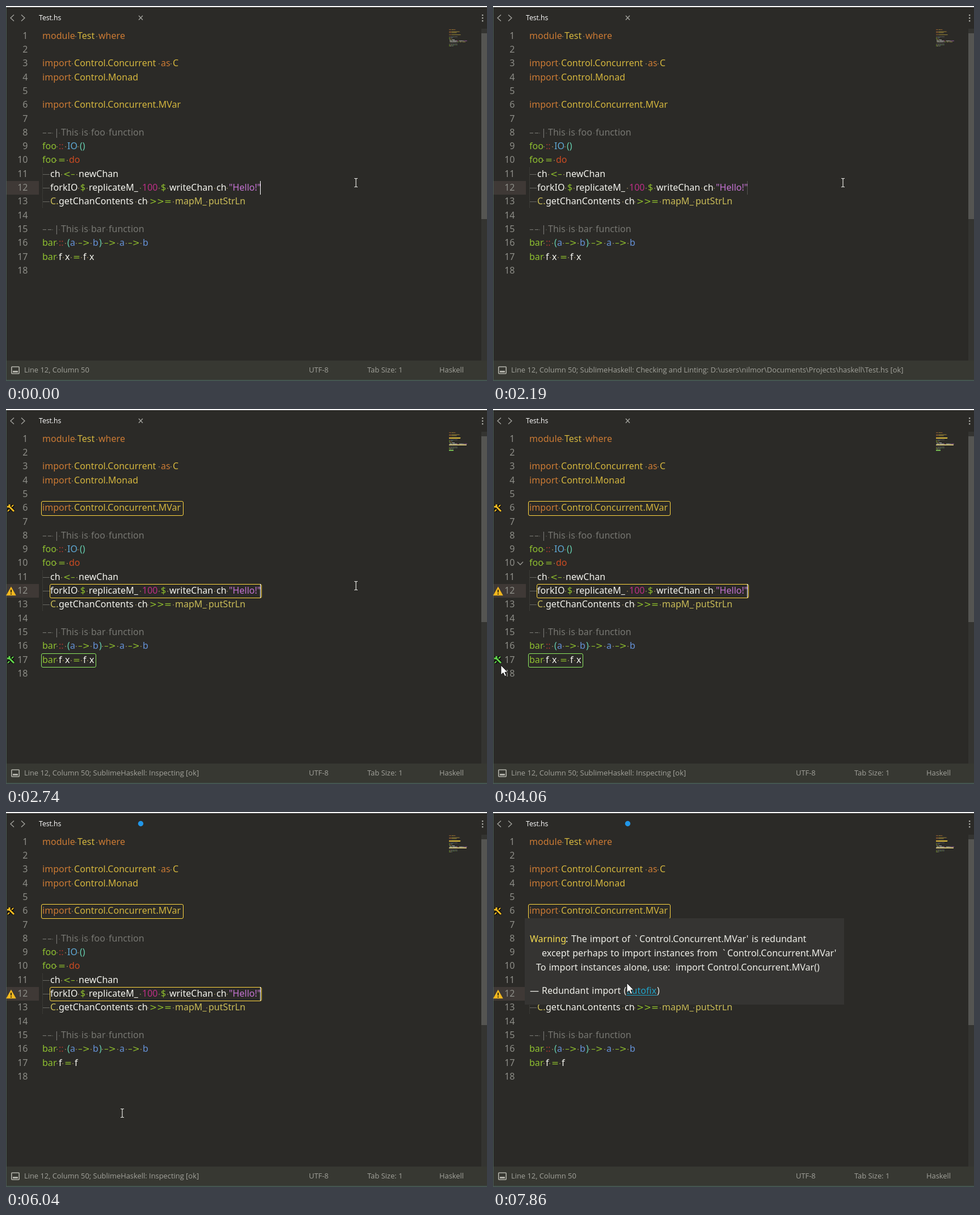
Animation, 848 px wide and 660 px high, one loop 8 s. Source, as an HTML page:

```html
<!DOCTYPE html>
<html lang="en">
<head>
<meta charset="utf-8">
<title>Editor hints</title>
<style>
  html, body { margin: 0; width: 100%; height: 100%; overflow: hidden; background: #2b2a27; }
  svg { display: block; width: 848px; height: 660px; }
  text { white-space: pre; }
  .code { font: 500 16px "Noto Sans", sans-serif; word-spacing: .7px; letter-spacing: .03px; }
  .op { font: 15.5px "DejaVu Sans", sans-serif; }
  .ui { font: 12.9px "Open Sans", sans-serif; }
</style>
</head>
<body>
<svg id="stage" viewBox="0 0 848 660" xmlns="http://www.w3.org/2000/svg"></svg>
<script>
const LOOP = 8000, ROW = 24.3, MARKERS_AT = 2310, FIX_AT = 5930;
const stage = document.getElementById('stage');

const COLORS = {
  o: '#cb7a34', y: '#d4b63e', g: '#8fc030', c: '#777772', r: '#a3382f', b: '#5fa9d6', t: '#66cfb0',
  d: '#cb4b22', w: '#f5f5ef', p: '#8cba2c', m: '#bd2f86', s: '#c473d2', k: '#cbbd58', v: '#6592d8'
};

// Each token: x, colour key, text. "+" marks a token without a space before it.
const CODE = {
  1: '64o module 126y Test 163o where',
  3: '64o import 120y Control.Concurrent 273o as 294y C',
  4: '64o import 120y Control.Monad',
  6: '64o import 120y Control.Concurrent.MVar',
  8: '64c – 73+c – 85c | 97c This 133c is 150c foo 181c function',
  9: '64g foo 93r :: 108b IO 130t ()',
  10: '64g foo 92p = 111d do',
  11: '78w ch 101p <– 128w newChan',
  12: '78w forkIO 131p $ 146w replicateM_ 240m 100 273p $ 288w writeChan 371w ch 393s "Hello!"',
  13: '78k C. 93+w getChanContents 232w ch 253p >>= 298k mapM_ 357k putStrLn',
  15: '64c – 73+c – 85c | 97c This 133c is 150c bar 181c function',
  16: '64g bar 93r :: 108t ( 113+v a 127p –> 153v b 164+t ) 173p –> 200v a 215p –> 241v b'
};
const LINE_17 = '64g bar 93w f 104w x 118p = 136w f 147w x';
const LINE_17_FIXED = '64g bar 93w f 103p = 121w f';

function add(parent, tag, attrs, content) {
  const node = document.createElementNS(stage.namespaceURI, tag);
  for (const key in attrs) node.setAttribute(key, attrs[key]);
  if (content) node.textContent = content;
  parent.append(node);
  return node;
}
const group = (parent = stage) => add(parent, 'g', {});
const rect = (parent, x, y, width, height, fill, more) =>
  add(parent, 'rect', { x, y, width, height, fill, ...more });
const path = (parent, d, stroke, width = 1, fill = 'none') =>
  add(parent, 'path', { d, stroke, 'stroke-width': width, fill });
const text = (parent, x, y, content, fill, kind = 'code', more) =>
  add(parent, 'text', { x, y, fill, class: kind, ...more }, content);
const rowTop = n => Math.round(308 + ROW * (n - 12));
const show = (node, on) => node.setAttribute('visibility', on ? 'visible' : 'hidden');

function codeLine(parent, n, source) {
  const top = rowTop(n);
  let first = true;
  for (const [, x, glued, key, word] of source.matchAll(/(\d+)(\+?)([a-z]) (\S+)/g)) {
    text(parent, x, top + 17, word, COLORS[key], /^[–<>=]+$/.test(word) ? 'op' : 'code');
    if (!first && !glued) rect(parent, x - 4, top + 12, 2, 1.5, key === 'c' ? '#4a4a46' : '#857650');
    rect(parent, 781 + (x - 64) * .08, 41 + 1.8 * (n - 1), word.length * .7, 1.1, COLORS[key], { opacity: .6 });
    first = false;
  }
}

// Window frame
rect(stage, 0, 0, 848, 660, '#2b2a27');
rect(stage, 838, 40, 10, 584, '#343431');
rect(stage, 838, 48, 10, 327, '#555552');
rect(stage, 0, 624, 848, 34, '#373832');
rect(stage, 0, 658, 848, 2, '#455650');
rect(stage, 0, 0, 1, 660, '#4a5b56');
rect(stage, 0, 0, 848, 2, '#fcfcfc');
path(stage, 'M14 15.5L8 21L14 26.5M27 15.5L33 21L27 26.5', '#a5a5a0', 1.3);
for (const y of [15, 20, 25]) rect(stage, 839, y, 2.4, 2.4, '#a5a5a0');
text(stage, 58, 25, 'Test.hs', '#fff', 'ui', { style: 'font-size:12.2px' });
const closeMark = path(stage, 'M234 17L241 24.5M241 17L234 24.5', '#a5a5a0', 1.3);
const dirtyDot = add(stage, 'circle', { cx: 237.5, cy: 20.5, r: 4.7, fill: '#2196e8' });

// Gutter and code
rect(stage, 1, 308, 57, 24, '#3f3936');
for (let n = 1; n <= 18; n++)
  text(stage, 38.5, rowTop(n) + 17, n, '#8d8d87', 'code', { 'text-anchor': 'end' });
const fold = path(stage, 'M43 269L48 274L53 269', '#9a9a94', 1.3);
for (const n of [11, 12, 13]) path(stage, `M65 ${rowTop(n) + 12.5}H77`, '#696963');
add(stage, 'path', { d: 'M64.5 284V356', stroke: '#4b4b46', 'stroke-dasharray': '1 1' });
for (const n in CODE) codeLine(stage, +n, CODE[n]);
const before = group(), after = group();
codeLine(before, 17, LINE_17);
codeLine(after, 17, LINE_17_FIXED);

// Hint markers
function outline(parent, x, y, right, bottom, stroke) {
  rect(parent, x + .5, y + .5, right - x - 1, bottom - y - 1, 'none', { rx: 2.5, stroke });
}
function tools(parent, y, color) {
  const icon = group(parent);
  icon.setAttribute('transform', `translate(1 ${y})`);
  const wrench = 'M4 4L13 13M1 5L5 5L5 1', handle = 'M2 13L5 10M9 5L12 2';
  path(icon, wrench + handle, '#0c0c0a', 5.5);
  path(icon, handle, color, 2);
  path(icon, wrench, color, 3);
}
const YELLOW = '#ffd640', GREEN = '#8ee860';
const warnings = group(), hint = group();
outline(warnings, 62, 162, 313, 188, YELLOW);
outline(warnings, 77, 308, 451, 333, YELLOW);
tools(warnings, 167, '#f6bd22');
path(warnings, 'M9 314L16.5 327.5H1.5Z', '#f3b71f', 1.5, '#f3b71f');
path(warnings, 'M9 318V323M9 324.5V326.5', '#221c08', 1.8);
rect(warnings, 781, 50.5, 20, 1.5, YELLOW);
rect(warnings, 781, 62.5, 31, 1.5, '#f2e08a');
outline(hint, 62, 430, 159, 455, GREEN);
tools(hint, 434, '#62d64c');
rect(hint, 781, 72, 8, 1.5, GREEN);
const caret = rect(stage, 448, 308, 1, 24, '#fff');

// Status bar
add(stage, 'rect', { x: 9.8, y: 635, width: 13.4, height: 12, rx: 1, fill: 'none', stroke: '#b2b2aa', 'stroke-width': 1.6 });
rect(stage, 12, 642, 9, 3, '#b2b2aa');
const GREY = '#a2a29b';
const status = text(stage, 32, 645, '', GREY, 'ui');
const fileInfo = group();
text(fileInfo, 534, 645, 'UTF-8', GREY, 'ui');
text(fileInfo, 637, 645, 'Tab Size: 1', GREY, 'ui');
text(fileInfo, 764, 645, 'Haskell', GREY, 'ui');

// Popups
const INK = '#efefe9';
function popup(x, y, right, bottom, phrases) {
  const box = group();
  rect(box, x, y, right - x, bottom - y, '#353432');
  for (const [px, py, words, color = INK] of phrases) text(box, px, py, words, color);
  return box;
}
function autofix(box, x, y) {
  text(box, x - 5, y, '(', INK);
  text(box, x, y, 'autofix', '#20a3c8');
  rect(box, x, y + 2, 54, 1, '#20a3c8');
  text(box, x + 53.5, y, ')', INK);
}
const hintPopup = popup(56, 454, 246, 624, [
  [65, 496, 'Hint', GREEN], [97, 496, ': Eta reduce'],
  [65, 537, '—'], [86, 537, 'Eta reduce'],
  [75, 562, 'Why not:', '#f5dc50'], [86, 607, 'bar f = f']
]);
autofix(hintPopup, 176, 537);
const warningPopup = popup(56, 187, 619, 339, [
  [65, 229, 'Warning', '#f5dc50'], [128, 229, ':'], [138, 229, 'The import of'],
  [250, 229, '`'], [258, 229, "Control.Concurrent.MVar'"], [456, 229, 'is redundant'],
  [86, 254, 'except perhaps to import instances from'], [405, 254, '`'], [413, 254, "Control.Concurrent.MVar'"],
  [76, 279, 'To import instances alone, use:'], [322, 279, 'import'], [378, 279, 'Control.Concurrent.MVar()'],
  [65, 320, '—'], [86, 320, 'Redundant import']
]);
autofix(warningPopup, 235.5, 320);

// Mouse
const mouse = group();
const beam = group(mouse), arrow = group(mouse);
path(beam, 'M-3 -7.5H-1L0 -6.5L1 -7.5H3M0 -6.5V6.5M-3 7.5H-1L0 6.5L1 7.5H3', '#e4e4e0', 1.2);
path(arrow, 'M0 0V17L4 13.3L6.8 19.5L9.6 18.2L6.9 12.2H12Z', '#111', 1, '#fff');

const MOUSE_KEYS = [ // time, x, y
  [2740, 617, 311], [3670, 100, 475], [4060, 14, 451], [4830, 14, 451], [5250, 170, 502],
  [5680, 205, 530], [6350, 205, 530], [7140, 13, 178], [7580, 13, 178], [7860, 236, 301]
];
function mouseAt(t) {
  const next = MOUSE_KEYS.findIndex(key => key[0] > t);
  if (next < 1) return (next ? MOUSE_KEYS.at(-1) : MOUSE_KEYS[0]).slice(1);
  const [t0, x0, y0] = MOUSE_KEYS[next - 1], [t1, x1, y1] = MOUSE_KEYS[next];
  const steps = Math.round((t1 - t0) / 135);
  const k = Math.floor((t - t0) / (t1 - t0) * steps) / steps;
  return [x0 + (x1 - x0) * k, y0 + (y1 - y0) * k];
}

function statusAt(t) {
  const position = 'Line 12, Column 50', plugin = position + '; SublimeHaskell: ';
  const checking = plugin + 'Checking and Linting: D:\\users\\nilmor\\Documents\\Projects\\haskell\\Test.hs';
  if (t < 550 || t >= 6600) return position;
  if (t < 1230) return checking;
  return t < MARKERS_AT ? checking + ' [ok]' : plugin + 'Inspecting [ok]';
}

function render(t) {
  const fixed = t >= FIX_AT;
  const hintOpen = t >= 4700 && !fixed, warningOpen = t >= 7280;
  const [x, y] = mouseAt(t);
  const inGutter = x < 58;
  const pointing = inGutter || hintOpen || warningOpen;
  mouse.setAttribute('transform', `translate(${x} ${y})`);
  show(arrow, pointing);
  show(beam, !pointing);
  show(fold, inGutter);
  caret.setAttribute('opacity', Math.floor((t - 150) / 510) & 1 ? 1 : .2);
  show(warnings, t >= MARKERS_AT);
  show(hint, t >= MARKERS_AT && !fixed);
  show(before, !fixed);
  show(after, fixed);
  show(closeMark, !fixed);
  show(dirtyDot, fixed);
  show(hintPopup, hintOpen);
  show(warningPopup, warningOpen);
  show(fileInfo, t < 550 || t >= MARKERS_AT);
  status.textContent = statusAt(t);
}

const start = performance.now();
function tick() {
  render((performance.now() - start) % LOOP);
  requestAnimationFrame(tick);
}
tick();
</script>
</body>
</html>
```
